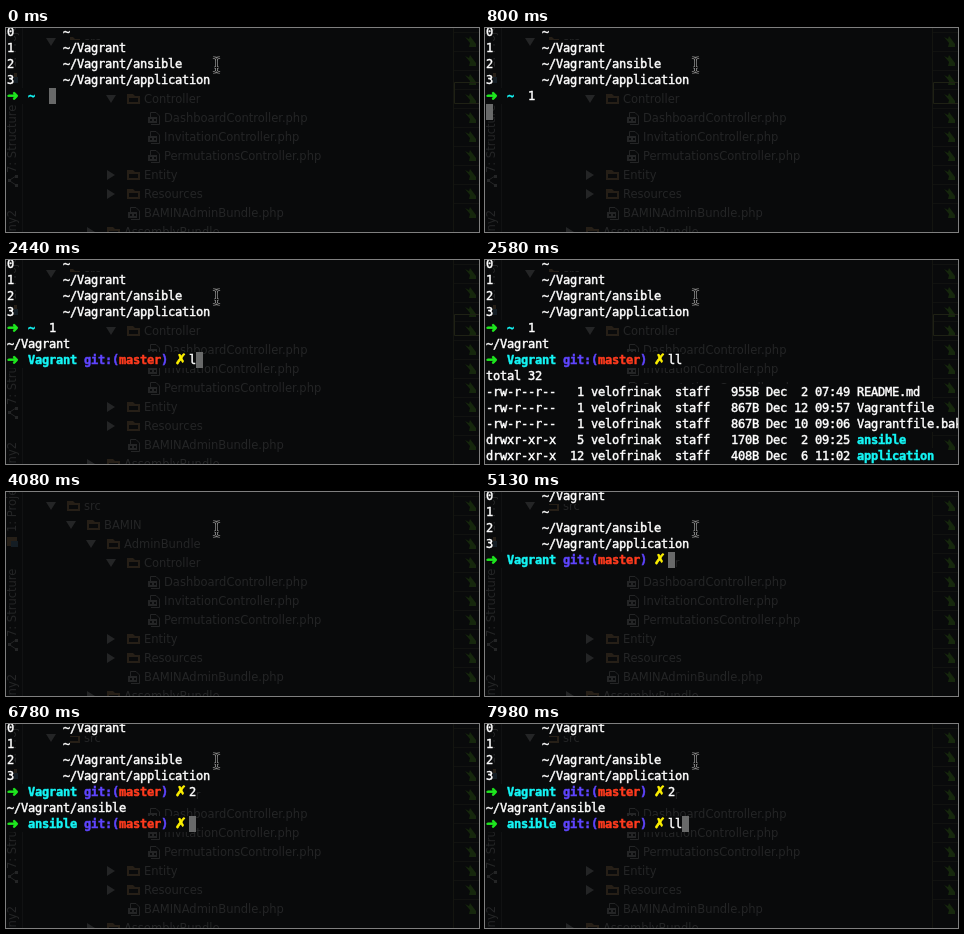
An HTML page with a canvas for the animation above (8000 ms loop, 473 px wide and 204 px high).

```html
<!DOCTYPE html>
<html lang="en">
<head>
<meta charset="utf-8">
<title>Directory stack in the terminal</title>
<style>
  html, body { margin: 0; width: 100%; height: 100%; overflow: hidden; background: #090a0b; }
  canvas { display: block; }
</style>
</head>
<body>
<canvas id="stage" width="473" height="204"></canvas>
<script>
const ctx = document.getElementById('stage').getContext('2d');
const LOOP = 8000, CLEARED = 4080, CELL = 7, ROW = 16;
const WHITE = '#fff', GREEN = '#1fe81f', CYAN = '#14f5f5', BLUE = '#5f45ff', RED = '#ff3b1e', YELLOW = '#fff200';
const BACK = '#090a0b', DIM = '#242526', FOLDER = '#261f17', LEAF = '#16270d';
const CURSOR = '█';

// A line is a list of runs: [column, text, colour]; coloured runs are bold.
const plain = text => [[0, text, WHITE]];
const dirs = (...paths) => paths.map((path, i) => [[0, String(i), WHITE], [8, path, WHITE]]);
const home = typed => [[0, '➜  ', GREEN], [3, '~  ', CYAN], [6, typed, WHITE]];
const prompt = (dir, typed) => [
  [0, '➜  ', GREEN], [3, dir + ' ', CYAN], [11, 'git:(', BLUE], [16, 'master', RED],
  [22, ') ', BLUE], [24, '✗ ', YELLOW], [26, typed, WHITE]
];
const entry = (mode, links, size, date, name, color = WHITE) => [
  [0, `${mode} ${links.padStart(3)} velofrinak  staff   ${size} Dec ${date} `, WHITE], [53, name, color]
];

const listing = [
  plain('total 32'),
  entry('-rw-r--r--', '1', '955B', ' 2 07:49', 'README.md'),
  entry('-rw-r--r--', '1', '867B', '12 09:57', 'Vagrantfile'),
  entry('-rw-r--r--', '1', '867B', '10 09:06', 'Vagrantfile.bak'),
  entry('drwxr-xr-x', '5', '170B', ' 2 09:25', 'ansible', CYAN),
  entry('drwxr-xr-x', '12', '408B', ' 6 11:02', 'application', CYAN)
];

const first = dirs('~', '~/Vagrant', '~/Vagrant/ansible', '~/Vagrant/application');
const second = dirs('~/Vagrant', '~', '~/Vagrant/ansible', '~/Vagrant/application');
const inVagrant = [...first, home('1'), plain('~/Vagrant')];
const inAnsible = [...second, prompt('Vagrant', '2'), plain('~/Vagrant/ansible')];

const screens = [
  [0, [...first, home(CURSOR)]],
  [500, [...first, home('1' + CURSOR)]],
  [800, [...first, home('1'), plain(CURSOR)]],
  [940, [...inVagrant, plain(CURSOR)]],
  [1090, [...inVagrant, prompt('Vagrant', CURSOR)]],
  [2440, [...inVagrant, prompt('Vagrant', 'l' + CURSOR)]],
  [2580, [...inVagrant, prompt('Vagrant', 'll'), ...listing]],
  [CLEARED, []],
  [5130, [...second, prompt('Vagrant', CURSOR)]],
  [6480, [...second, prompt('Vagrant', '2' + CURSOR)]],
  [6780, [...inAnsible, prompt('ansible', CURSOR)]],
  [7830, [...inAnsible, prompt('ansible', 'l' + CURSOR)]],
  [7980, [...inAnsible, prompt('ansible', 'll' + CURSOR)]]
];

const tree = [
  ['src', 0, 'open'], ['BAMIN', 1, 'open'], ['AdminBundle', 2, 'open'], ['Controller', 3, 'open'],
  ['DashboardController.php', 4, 'file'], ['InvitationController.php', 4, 'file'],
  ['PermutationsController.php', 4, 'file'], ['Entity', 3, 'closed'], ['Resources', 3, 'closed'],
  ['BAMINAdminBundle.php', 3, 'file'], ['AssemblyBundle', 2, 'closed']
];

function rect(x, y, w, h, color) {
  ctx.fillStyle = color;
  ctx.fillRect(x, y, w, h);
}

function shape(points, color) {
  ctx.fillStyle = color;
  ctx.beginPath();
  points.forEach(([x, y]) => ctx.lineTo(x, y));
  ctx.fill();
}

function line(points, color, width = 1) {
  ctx.strokeStyle = color;
  ctx.lineWidth = width;
  ctx.beginPath();
  points.forEach(([x, y]) => ctx.lineTo(x, y));
  ctx.stroke();
}

function label(text, x, y, align = 'left') {
  ctx.font = '11.5px "DejaVu Sans", sans-serif';
  ctx.textAlign = align;
  ctx.fillStyle = DIM;
  ctx.fillText(text, x, y);
  ctx.textAlign = 'left';
}

function sideLabel(text, y, align) {
  ctx.save();
  ctx.translate(10, y);
  ctx.rotate(-Math.PI / 2);
  label(text, 0, 0, align);
  ctx.restore();
}

function drawItem([text, depth, kind], i) {
  const x = 78 + 20 * depth, y = 14 + 19 * i;
  label(text, x, y + 4);
  if (kind === 'file') {
    line([[x - 13.5, y], [x - 13.5, y - 5.5], [x - 8, y - 5.5], [x - 4.5, y - 2], [x - 4.5, y + 6.5], [x - 13, y + 6.5]], DIM);
    rect(x - 16, y - 1, 9, 6, DIM);
    rect(x - 14, y + 1, 2, 2, BACK);
    rect(x - 10, y + 1, 2, 2, BACK);
    return;
  }
  shape(kind === 'open'
    ? [[x - 38, y - 4], [x - 28, y - 4], [x - 33, y + 4]]
    : [[x - 37, y - 5], [x - 29, y], [x - 37, y + 5]], DIM);
  shape([[x - 17, y - 5], [x - 11, y - 5], [x - 9, y - 3], [x - 4, y - 3], [x - 4, y + 5], [x - 17, y + 5]], FOLDER);
  rect(x - 15, y - 1, 9, 4, BACK);
}

function drawGutter(highlight) {
  rect(447, 0, 1, 204, '#141510');
  for (let y = 14; y < 204; y += 19) {
    rect(448, y - 10, 25, 1, '#111210');
    shape([[459, y - 5], [463, y - 3], [464, y - 6], [467, y - 2], [470, y + 2], [470, y + 5], [463, y + 5], [464, y + 1]], LEAF);
  }
  if (highlight) line([[474, 54.5], [448.5, 54.5], [448.5, 75.5], [474, 75.5]], '#1f2115');
}

function drawEditor(highlight) {
  rect(0, 0, 473, 204, BACK);
  rect(16, 0, 1, 204, '#111213');
  sideLabel('1: Project', 40, 'left');
  sideLabel('7: Structure', 145, 'left');
  sideLabel('Symfony2', 182, 'right');
  rect(1, 45, 10, 9, FOLDER);
  rect(5, 49, 7, 6, '#141d24');
  line([[10, 148], [3, 152.5], [10, 157]], DIM);
  [[2, 151], [9, 147], [9, 156]].forEach(([x, y]) => rect(x, y, 3, 3, DIM));
  tree.forEach(drawItem);
  drawGutter(highlight);
}

function drawRun([col, text, color], row) {
  const top = row * ROW - 4, x = 1 + col * CELL;
  rect(x, top, text.length * CELL, ROW, BACK);
  [...text].forEach((char, i) => {
    const left = x + i * CELL;
    if (char === CURSOR) return rect(left, top, CELL, ROW, '#686969');
    const symbol = '➜✗'.includes(char);
    ctx.font = symbol ? 'bold 14px "DejaVu Sans", sans-serif'
      : `${color === WHITE ? '' : 'bold '}12px "DejaVu Sans Mono", monospace`;
    ctx.fillStyle = ctx.strokeStyle = color;
    ctx.lineWidth = symbol ? 0.8 : 0.45;
    ctx.fillText(char, left, top + 12);
    ctx.strokeText(char, left, top + 12);
  });
}

function drawPointer() {
  const parts = [
    [[207, 29.5], [209.5, 30], [210.5, 31.5], [211.5, 30], [214, 29.5]],
    [[210.5, 31], [210.5, 43]],
    [[207, 44.5], [209.5, 44], [210.5, 42.5], [211.5, 44], [214, 44.5]],
    [[208.5, 39.5], [212.5, 39.5]]
  ];
  parts.forEach(p => line(p, '#868686', 2.6));
  parts.forEach(p => line(p, '#0a0a0a', 1));
}

function render() {
  const time = performance.now() % LOOP;
  const [, lines] = screens.findLast(([start]) => start <= time);
  drawEditor(time < CLEARED);
  lines.forEach((runs, row) => runs.forEach(run => drawRun(run, row)));
  drawPointer();
  requestAnimationFrame(render);
}
render();
</script>
</body>
</html>
```
